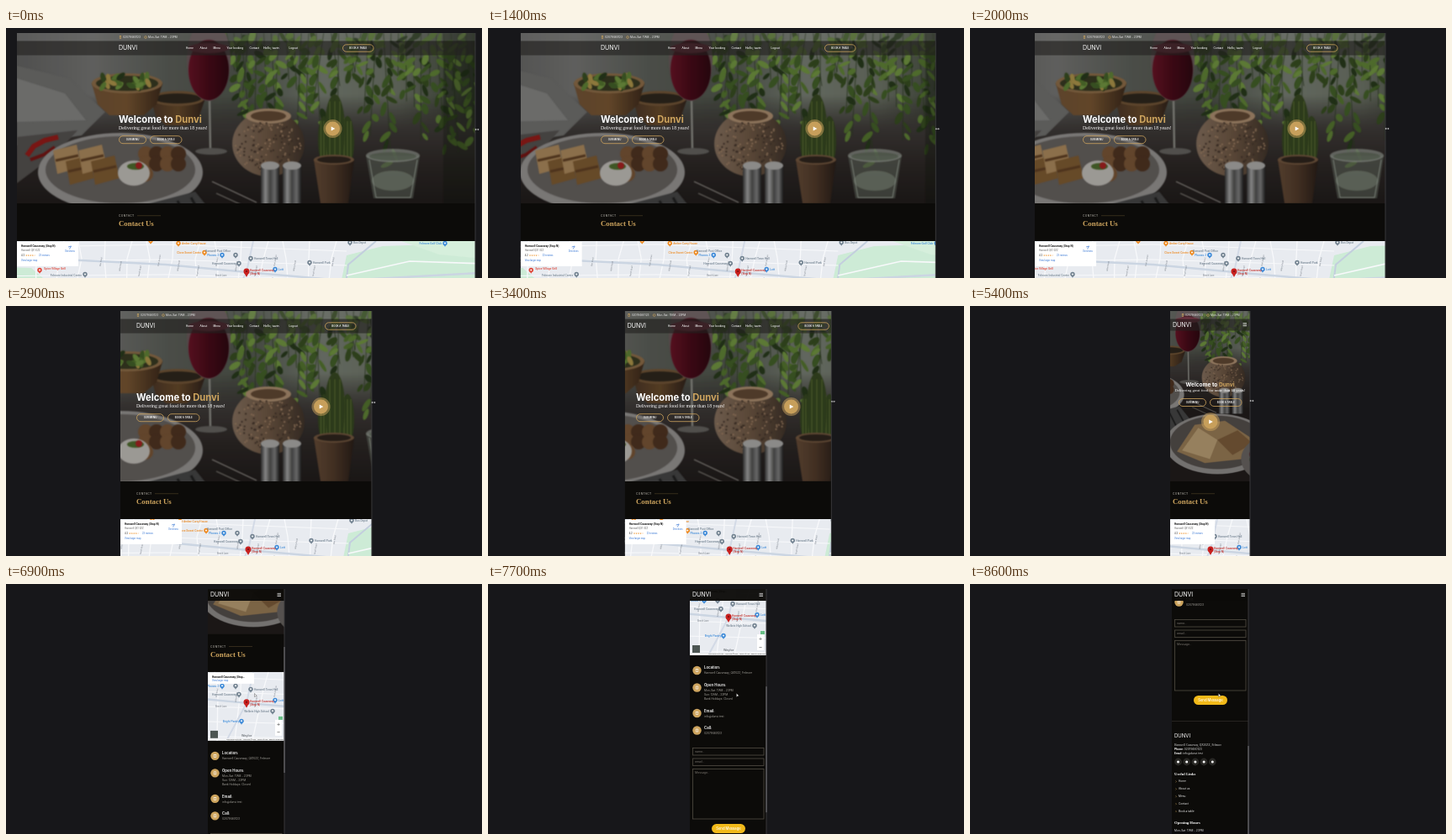
Recreate the animation shown at these times as an HTML page with a canvas. Size 566 by 298 pixels, loop 9000 ms.

```html
<!DOCTYPE html>
<html lang="en">
<head>
<meta charset="utf-8">
<title>Responsive restaurant page</title>
<style>
html, body { margin: 0; width: 100%; height: 100%; overflow: hidden; background: #17171a; }
canvas { display: block; width: 566px; height: 298px; }
</style>
</head>
<body>
<canvas id="stage"></canvas>
<script>
const W = 566, H = 298, TOP = 6, MID = 285.5, LOOP = 9000;
const SANS = 'Inter, sans-serif', SERIF = '"Liberation Serif", serif', MAPFONT = 'Roboto, sans-serif';
const GOLD = '#cda45e', INK = '#0c0b09';
const BRAND = 'Dunvi', PLACE = 'Harnwell Causeway', PHONE = '02079460123', EMAIL = 'info@dunvi.test';
const HOURS = 'Mon-Sat: 11AM - 23PM';

const canvas = document.getElementById('stage');
const dpr = window.devicePixelRatio || 1;
canvas.width = W * dpr;
canvas.height = H * dpr;
let g = canvas.getContext('2d');

// Linear interpolation through [time, value] points
function track(points, t) {
  if (t <= points[0][0]) return points[0][1];
  for (let i = 1; i < points.length; i++) {
    const [a, u] = points[i - 1], [b, v] = points[i];
    if (t <= b) return u + (v - u) * (t - a) / (b - a);
  }
  return points[points.length - 1][1];
}

const LEFT = [[1000, 13], [2000, 77], [2900, 136], [3000, 143], [4000, 192], [4200, 198], [5000, 225], [5400, 238], [6900, 240]];
const SCROLL = [[5900, 0], [6900, 149], [7400, 215], [7500, 215], [8500, 394], [8600, 404]];
const MAP_SHIFT = [[1000, 0], [2000, 28], [2900, 2], [4200, 0]];
const CURSOR_Y = [[0, 121], [2000, 120], [2900, 115], [4200, 112], [5400, 113]];

function rect(x, y, w, h, fill) {
  g.fillStyle = fill;
  g.fillRect(x, y, w, h);
}
function oval(x, y, rx, ry, fill, rot = 0) {
  g.fillStyle = fill;
  g.beginPath();
  g.ellipse(x, y, rx, ry, rot, 0, 7);
  g.fill();
}
const disc = (x, y, r, fill) => oval(x, y, r, r, fill);
function path(pts, color, width) {
  g.beginPath();
  pts.forEach(([x, y], i) => i ? g.lineTo(x, y) : g.moveTo(x, y));
  if (width) {
    g.strokeStyle = color;
    g.lineWidth = width;
    g.stroke();
  } else {
    g.fillStyle = color;
    g.fill();
  }
}
function text(s, x, y, size, color, { w = 400, f = SANS, align = 'left', gap = 0 } = {}) {
  g.font = `${w} ${size}px ${f}`;
  g.letterSpacing = gap + 'px';
  g.textAlign = align;
  g.textBaseline = 'middle';
  g.fillStyle = color;
  g.fillText(s, x, y);
  return g.measureText(s).width;
}
function pill(x, y, w, h, label, size = 2.9) {
  g.beginPath();
  g.roundRect(x, y, w, h, h / 2);
  g.strokeStyle = GOLD;
  g.lineWidth = 0.8;
  g.stroke();
  text(label, x + w / 2, y + h / 2 + 0.2, size, '#fff', { w: 600, align: 'center' });
}
// Gradient from evenly spaced colours
function blend(x0, y0, x1, y1, ...colors) {
  const grad = g.createLinearGradient(x0, y0, x1, y1);
  colors.forEach((c, i) => grad.addColorStop(i / (colors.length - 1), c));
  return grad;
}

function makePhoto() {
  const c = document.createElement('canvas');
  c.width = 546 * 2;
  c.height = 342 * 2;
  const main = g;
  g = c.getContext('2d');
  g.scale(2, 2);
  g.translate(-12.5, -TOP);
  g.filter = 'blur(1.4px)';
  let seed = 7;
  const rnd = () => (seed = seed * 16807 % 2147483647) / 2147483647;

  // Bright window, pale cloth, dark table
  rect(0, 0, W, 360, blend(13, 0, 558, 0, '#5c5c5b', '#6d6d6b', '#555852', '#4c5148', '#70766c', '#666c60', '#343a2e'));
  rect(0, 80, W, 280, blend(0, 80, 0, 205, 'rgba(42,38,36,0)', '#3a3634', '#2a2523', '#1f1b1a'));
  path([[13, 45], [75, 60], [118, 100], [90, 128], [13, 140]], '#696967');
  path([[13, 60], [70, 78], [95, 110], [13, 112]], '#7b7b79');
  path([[13, 130], [85, 122], [60, 150], [13, 185]], '#4f4c4a');

  // Foliage: hanging stems with paired leaves
  const greens = ['#34491f', '#4f6d2c', '#25361a', '#6a8b3d', '#3f5a26', '#5a7a33'];
  for (let i = 0; i < 34; i++) {
    const x0 = 262 + i * 8.9, len = 45 + rnd() * 115, lean = rnd() * 24 - 12;
    path([[x0, 6], [x0 + lean, 6 + len]], '#2c3a20', 0.8);
    for (let d = rnd() * 12; d < len; d += 11) {
      const side = rnd() < 0.5 ? -1 : 1, x = x0 + lean * d / len + side * 5;
      oval(x, 8 + d, 5 + rnd() * 4, 2 + rnd() * 2, greens[Math.floor(rnd() * 6)], side * (0.4 + rnd()));
    }
  }
  rect(520, 6, 40, 205, 'rgba(15,20,10,.3)');

  // Wooden bowls
  path([[172, 84], [237, 84], [229, 107], [215, 116], [190, 116], [178, 105]], blend(172, 0, 237, 0, '#473324', '#604528', '#2d2019'));
  oval(204, 84, 32, 9, '#6b5034');
  oval(204, 84, 28, 6, '#2b241b');
  path([[102, 66], [186, 66], [179, 91], [164, 104], [123, 104], [109, 91]], blend(102, 0, 186, 0, '#6b4e32', '#70502f', '#392719'));
  oval(144, 66, 42, 12, '#846644');
  oval(144, 66, 37, 9, '#343620');
  for (let i = 0; i < 24; i++) oval(110 + rnd() * 66, 56 + rnd() * 14, 6, 3, i % 4 ? greens[i % 6] : '#a18a45', rnd() * 3);

  // Chillies
  path([[25, 152], [33, 141], [46, 134], [62, 130]], '#8b1a17', 6);
  path([[29, 157], [45, 151], [58, 142]], '#6f1513', 4);

  // Wine
  path([[242, 86], [243, 145]], '#82827c', 2.5);
  oval(244, 147, 19, 4, '#5d5b58');
  oval(241, 38, 26, 49, '#625254');
  oval(241, 50, 24, 36, blend(216, 0, 266, 0, '#631324', '#430a17', '#2b0810'));
  oval(241, 24, 24, 6, '#74283a');

  // Candle holder
  oval(312, 138, 43, 39, blend(270, 0, 355, 0, '#7c6857', '#66513f', '#3d3128'));
  oval(312, 105, 27, 9, '#a18569');
  oval(312, 105, 21, 6, '#5a4330');
  for (let i = 0; i < 150; i++) {
    const a = rnd() * 6.3, r = Math.sqrt(rnd());
    disc(312 + Math.cos(a) * r * 40, 142 + Math.sin(a) * r * 31, 1.1, i % 2 ? '#94775d' : '#3f3128');
  }

  // Cactus
  for (const [x, y, rx, ry] of [[378, 133, 7, 28], [406, 135, 8, 30], [391, 121, 12, 42]]) {
    oval(x, y, rx, ry, '#33431f');
    for (let d = -rx / 2; d <= rx / 2; d += rx / 2) path([[x + d, y - ry * 0.8], [x + d, y + ry * 0.8]], '#596b32', 1);
  }
  path([[366, 157], [414, 157], [407, 209], [374, 209]], blend(366, 0, 414, 0, '#5f4734', '#4b3627', '#281d17'));
  oval(390, 157, 24, 6, '#6c523c');
  oval(390, 157, 20, 4, '#2b221b');

  // Water glass
  g.globalAlpha = 0.6;
  path([[428, 152], [492, 152], [484, 203], [437, 203]], '#5f675c');
  oval(460, 152, 32, 8, '#9da39b');
  oval(460, 153, 28, 5, '#4c5845');
  oval(460, 182, 25, 12, '#7d8879');
  g.globalAlpha = 1;
  path([[432, 157], [440, 202], [481, 202], [489, 157]], '#8c948a', 1);

  // Plate with pastries
  oval(136, 172, 98, 47, '#8b8987');
  oval(136, 169, 89, 40, '#5f5b58');
  for (let i = 0; i < 4; i++) {
    const x = 56 + i * 15, y = 146 + i % 2 * 13;
    path([[x, y], [x + 28, y - 7], [x + 34, y + 20], [x + 5, y + 28]], i % 2 ? '#76552f' : '#a08057');
    path([[x + 3, y + 12], [x + 30, y + 6]], '#5a3c22', 3);
  }
  for (let i = 0; i < 9; i++) disc(166 + i % 4 * 13, 150 + Math.floor(i / 4) * 12, 9, i % 2 ? '#4a3120' : '#715033');
  oval(152, 173, 19, 15, '#b3b0ab');
  oval(154, 165, 10, 4, '#49642b');
  disc(158, 164, 4, '#9c2020');

  // Napkin and cutlery
  path([[130, 220], [225, 195], [265, 245], [150, 290]], '#414141');
  for (let i = 0; i < 6; i++) path([[140 + i * 16, 222 - i * 4], [160 + i * 17, 282 - i * 7]], '#202020', 3);
  path([[245, 183], [298, 208]], '#77736f', 1.5);
  path([[250, 197], [300, 220]], '#686560', 1.5);

  // Lower plates
  oval(300, 270, 104, 60, '#858280');
  oval(300, 267, 94, 53, '#4f4a47');
  path([[220, 285], [255, 232], [315, 224], [377, 265], [350, 300], [275, 308]], '#8e7350');
  path([[230, 283], [262, 238], [300, 262], [285, 300]], '#ad946d');
  path([[300, 262], [340, 243], [370, 269], [330, 292]], '#735637');
  oval(405, 300, 58, 46, '#625e5b');
  for (let i = 0; i < 22; i++) disc(370 + rnd() * 70, 275 + rnd() * 45, 8, i % 2 ? '#551d20' : '#37472a');

  // Shakers
  for (const x of [314, 340]) {
    rect(x - 11, 164, 22, 46, blend(x - 11, 0, x + 11, 0, '#333', '#999', '#4b4b4a', '#777', '#222'));
    oval(x, 164, 11, 5, '#a09f9d');
  }
  rect(0, 0, W, 360, 'rgba(0,0,0,.13)');
  g = main;
  return c;
}
const photo = makePhoto();

function pin(x, y, color, label = '', dx = 4, dy = 0) {
  path([[x - 2.4, y], [x + 2.4, y], [x, y + 3.8]], color);
  disc(x, y - 0.5, 2.7, color);
  disc(x, y - 0.5, 1, '#fff');
  if (label) text(label, x + dx, y + dy, 3.3, color, { w: 500, f: MAPFONT, align: dx < 0 ? 'right' : 'left' });
}

function drawMap(left, right, shift, y0, small) {
  g.save();
  g.beginPath();
  g.rect(left, y0, right - left, 82);
  g.clip();
  g.save();
  g.translate(shift, y0 - 254);
  rect(-60, 254, 700, 82, '#e8ebf0');
  path([[405, 271], [448, 260], [510, 258], [570, 268], [570, 336], [410, 336], [399, 300]], '#cdebd6');
  path([[470, 254], [570, 254], [570, 275], [515, 270]], '#d6efdc');
  path([[-60, 284], [30, 286], [44, 298], [-60, 310]], '#cdebd6');
  const road = '#f8f9fb';
  for (let i = 0; i < 15; i++) {
    const x = 5 + i * 27;
    path([[x + i % 3 * 5, 254], [x + 4, 275], [x + 9 - i % 4 * 6, 336]], road, 1.3);
  }
  for (let i = 0; i < 5; i++) path([[-40, 262 + i * 17], [190, 258 + i * 18], [405, 266 + i * 17]], road, 1);
  path([[-40, 272], [90, 277], [190, 282], [286, 291], [400, 301], [600, 290]], '#cbd5e2', 2.4);
  path([[262, 336], [276, 310], [286, 291], [294, 254]], '#d3dae6', 2);
  path([[400, 336], [407, 282], [440, 254]], '#c3cede', 2);
  path([[405, 295], [480, 278], [570, 281]], road, 1.6);

  const streets = ['Elm Road', 'Alder Road', 'North Road', 'Park Avenue', 'Abbey Road', 'South Road'];
  for (let i = 0; i < 13; i++) {
    g.save();
    g.translate(112 + i * 23, 284 + i % 3 * 6);
    g.rotate(-1.4);
    text(streets[i % 6], 0, 0, 2.5, '#777e87', { f: MAPFONT });
    g.restore();
  }
  text('Beech Lane', 249, 295, 2.6, '#777e87', { f: MAPFONT });

  const grey = '#738391', blue = '#3f8bd8', orange = '#ee8a20';
  pin(205, 257, orange, 'Amber Curry House');
  pin(236, 268, orange, 'Clove Sweet Centre', -4);
  pin(172, 254, orange, '');
  pin(257, 271, blue, 'Phones 2', -4);
  pin(273, 271, grey, 'Harnwell Post Office', -6, -4.5);
  pin(291, 275, grey, 'Harnwell Town Hall');
  pin(277, 281, grey, PLACE, -3);
  pin(361, 280, grey, 'Harnwell Park');
  pin(409, 256, grey, 'Bus Depot');
  pin(522, 257, blue, 'Felmore Golf Club', -4);
  pin(40, 289, '#de4739', 'Spice Village Grill', 5, -2);
  pin(94, 294, grey, 'Felmore Industrial Centre', -4, 1);
  pin(320, 288, blue, 'Lott', 4);
  pin(317, 301, grey, 'Welbrin High School', -4);
  pin(280, 313, blue, 'Bright Pantry', -3);
  disc(286, 290, 3.5, '#c8201e');
  path([[282.8, 291], [289.2, 291], [286, 297]], '#c8201e');
  disc(286, 290, 1.1, '#7c0d12');
  text(PLACE, 290, 289, 3.3, '#c3322d', { w: 500, f: MAPFONT });
  text('(Stop N)', 290, 292.8, 3.3, '#c3322d', { w: 500, f: MAPFONT });
  text('Waylor', 286, 330, 4, '#6d7278', { w: 500, f: MAPFONT, align: 'center' });
  g.restore();

  // Info card
  const link = '#3575d3', wide = right - left > 110;
  rect(left, y0 + 1, wide ? 73 : small ? 55 : 53, small ? 13 : 29, '#fff');
  text(small ? 'Harnwell Causeway (Stop…' : PLACE + ' (Stop N)', left + 5, y0 + 6.5, 3.2, '#111', { w: 700, f: MAPFONT });
  if (small) {
    text('View larger map', left + 5, y0 + 10.8, 2.7, link, { f: MAPFONT });
  } else {
    text('Harnwell QX1 0ZZ', left + 5, y0 + 11.5, 2.8, '#666', { f: MAPFONT });
    text('4.2', left + 5, y0 + 17.5, 2.9, '#333', { f: MAPFONT });
    text('★★★★☆', left + 10, y0 + 17.5, 2.8, '#ec8c1d', { f: '"DejaVu Sans", sans-serif' });
    text('23 reviews', left + 26, y0 + 17.5, 2.7, link, { f: MAPFONT });
    text('View larger map', left + 5, y0 + 23.5, 2.7, link, { f: MAPFONT });
    if (wide) {
      path([[left + 61, y0 + 7], [left + 64.5, y0 + 6], [left + 62.5, y0 + 9.5]], link, 0.7);
      text('Directions', left + 63, y0 + 12.5, 2.6, link, { f: MAPFONT, align: 'center' });
    }
  }

  // Controls and credits
  rect(left + 3, y0 + 70, 9, 9, '#4d5653');
  rect(right - 11, y0 + 57, 8, 19, '#fff');
  rect(right - 7, y0 + 53, 5, 4, '#69bf87');
  text('+', right - 7, y0 + 62, 7, '#555', { align: 'center' });
  text('−', right - 7, y0 + 71.5, 7, '#555', { align: 'center' });
  rect(left, y0 + 79, right - left, 3, 'rgba(245,245,245,.85)');
  text('Keyboard shortcuts   Map data ©2023   Terms of Use   Report a map error', right - 1, y0 + 80.6, 2.1, '#333', { f: MAPFONT, align: 'right' });
  g.restore();
}

function drawHero(left, right, box, mobile, scroll) {
  const k = mobile ? 0.6 : 1, y = TOP - scroll;
  g.save();
  g.beginPath();
  g.rect(left, y, right - left, 203);
  g.clip();
  g.drawImage(photo, MID - 273 * k, y, 546 * k, 342 * k);
  g.restore();
  const size = mobile ? 6.55 : 11.2, ty = (mobile ? 93.8 : 109.4) - scroll;
  const bold = { w: 700 }, hello = 'Welcome to ';
  g.font = `700 ${size}px ${SANS}`;
  g.letterSpacing = '0px';
  const x = mobile ? MID - g.measureText(hello + BRAND).width / 2 : box;
  const w = text(hello, x, ty, size, '#fff', bold);
  text(BRAND, x + w, ty, size, GOLD, bold);
  text('Delivering great food for more than 18 years!', mobile ? MID : box, (mobile ? 100.5 : 119) - scroll,
    mobile ? 4.6 : 5.8, '#fff', { f: SERIF, align: mobile ? 'center' : 'left' });
  const bx = mobile ? 248.5 : box + 0.5, by = (mobile ? 110.5 : 128.7) - scroll;
  pill(bx, by, 32, 9, 'OUR MENU');
  pill(bx + 37, by, 37.5, 9, 'BOOK A TABLE');
  const px = mobile ? 286 : box + (MID - box) * 5 / 3 + 2, py = (mobile ? 138 : 120) - scroll;
  disc(px, py, 11, 'rgba(205,164,94,.5)');
  disc(px, py, 8.5, '#c79f5b');
  path([[px - 1.8, py - 2.6], [px + 2.8, py], [px - 1.8, py + 2.6]], '#fff');
}

function drawHeader(left, right, mobile, scroll) {
  const width = right - left, moved = scroll > 8, y = moved ? TOP : 15.5;
  const side = width > 328 ? 151.5 : width > 281 ? 130.5 : width / 2 - 3;
  const x = MID - side;
  if (!moved) {
    rect(left, TOP, width, 9.5, 'rgba(150,150,148,.16)');
    const tx = mobile ? 251 : x;
    g.strokeStyle = GOLD;
    g.lineWidth = 0.6;
    g.strokeRect(tx + 1.2, 9.5, 1.6, 3);
    text(PHONE, tx + 5, 11.3, 3.2, '#eee');
    g.beginPath();
    g.arc(tx + 32, 11, 1.4, 0, 7);
    g.stroke();
    text(HOURS, tx + 35, 11.3, 3.2, '#eee');
  }
  const h = mobile ? 14 : 17;
  rect(left, y, width, h, moved ? 'rgba(12,11,9,.96)' : 'rgba(34,33,31,.62)');
  const cy = moved ? 13.3 : mobile ? 22.5 : 24;
  text(BRAND.toUpperCase(), x, cy, 7, '#fff', { w: 400 });
  if (mobile) {
    for (const d of [-1.7, 0, 1.7]) rect(right - 8.5, cy - 0.7 + d, 4.5, 0.7, '#eee');
    return;
  }
  const nav = [['Home', 214], ['About', 230.5], ['Menu', 246.5], ['Your booking', 262.5], ['Contact', 289.5], ['Logout', 336.5]];
  for (const [s, nx] of nav) text(s, nx, cy, 3.1, '#fff', { w: 500 });
  text('Hello, tavin', 306, cy, 3.5, '#fff', { w: 500 });
  pill(MID + side - 36.5, 19.8, 36.5, 8.4, 'BOOK A TABLE');
}

function drawDetails(left, right, scroll) {
  const x = left + 3, w = right - left - 6;
  g.save();
  g.translate(0, -scroll);
  const info = [
    [354, 351, 'Location:', [PLACE + ', QX10ZZ, Felmore']],
    [374.5, 372, 'Open Hours:', ['Mon-Sat: 11AM - 23PM', 'Sun: 12AM - 22PM', 'Bank Holidays: Closed']],
    [405, 402.5, 'Email:', [EMAIL]],
    [425.5, 422.5, 'Call:', [PHONE]]
  ];
  for (const [iy, hy, title, lines] of info) {
    disc(x + 5.5, iy, 5.2, GOLD);
    g.strokeStyle = '#fff';
    g.lineWidth = 0.6;
    g.strokeRect(x + 4.2, iy - 1.5, 2.6, 3);
    text(title, x + 14, hy, 4.3, '#fff', { w: 600 });
    lines.forEach((s, i) => text(s, x + 14, hy + 6.5 + i * 5, 3.2, '#a5a29c'));
  }
  for (const [y, h, label] of [[446.5, 8.5, 'name..'], [459, 8.5, 'email..'], [471.5, 59.5, 'Message..']]) {
    g.strokeStyle = '#514c43';
    g.lineWidth = 0.8;
    g.strokeRect(x + 0.5, y, w - 0.5, h);
    text(label, x + 3, y + 4.4, 3.5, '#77736c');
  }
  g.fillStyle = '#f1b919';
  g.beginPath();
  g.roundRect(MID - 19.5, 537, 40, 11, 5.5);
  g.fill();
  text('Send Message', MID + 0.5, 542.6, 4.2, '#fff', { w: 500, align: 'center' });

  rect(left, 567, right - left, 0.8, '#2d2a26');
  text(BRAND.toUpperCase(), x, 585.5, 6, '#fff', { w: 400 });
  text(PLACE + ', QX10ZZ, Felmore', x, 596, 3.5, '#ddd', { f: SERIF });
  const ph = text('Phone: ', x, 601.3, 3.2, '#fff', { w: 700 });
  text(PHONE, x + ph, 601.3, 3.2, '#ddd');
  const em = text('Email: ', x, 606.3, 3.2, '#fff', { w: 700 });
  text(EMAIL, x + em, 606.3, 3.2, '#ddd');
  for (let i = 0; i < 5; i++) {
    disc(x + 4.5 + i * 10.2, 616, 4.4, '#292825');
    disc(x + 4.5 + i * 10.2, 616, 1.5, '#fff');
  }
  const head = { w: 700, f: SERIF };
  text('Useful Links', x, 630.5, 4.7, '#fff', head);
  ['Home', 'About us', 'Menu', 'Contact', 'Book a table'].forEach((s, i) => {
    const y = 639.5 + i * 8.9;
    path([[x + 1.5, y - 1], [x + 2.5, y], [x + 1.5, y + 1]], GOLD, 0.5);
    text(s, x + 5, y, 3.2, '#eee');
  });
  text('Opening Hours', x, 689, 4.7, '#fff', head);
  text(HOURS, x, 698, 3.2, '#ddd');
  g.restore();
}

function drawCursor(right, t) {
  if (t < 5900) {
    const x = right + 2, y = track(CURSOR_Y, t);
    path([[x - 1.8, y], [x + 1.8, y]], '#bbb', 0.7);
    path([[x - 2.6, y], [x - 1, y - 1.2], [x - 1, y + 1.2]], '#bbb');
    path([[x + 2.6, y], [x + 1, y - 1.2], [x + 1, y + 1.2]], '#bbb');
  } else {
    const x = track([[5900, 333], [6400, 295.5]], t), y = track([[5900, 113], [6400, 130.5]], t);
    const tip = [[x, y], [x + 2.8, y + 2.8], [x + 1.5, y + 3], [x, y + 4], [x, y]];
    path(tip, '#fff');
    path(tip, '#333', 0.4);
  }
}

function draw(t) {
  const left = track(LEFT, t), right = 2 * MID - left, width = right - left;
  const scroll = track(SCROLL, t), mobile = width < 232;
  // Container half widths at each breakpoint
  const half = width > 328 ? 151.5 : width > 281 ? 130.5 : width > 232 ? 109.5 : width > 180 ? 81.5 : width > 135 ? 60.5 : width / 2 - 3;
  const box = MID - half;
  g.setTransform(dpr, 0, 0, dpr, 0, 0);
  rect(0, 0, W, H, '#17171a');
  g.save();
  g.beginPath();
  g.rect(left, TOP, width, H - TOP);
  g.clip();
  rect(left, TOP, width, H, INK);
  drawHero(left, right, box, mobile, scroll);
  text('CONTACT', box, 224 - scroll, 3.3, '#aaa79f', { w: 500, gap: 0.35 });
  rect(box + 22, 223.6 - scroll, 28, 0.5, '#5c4b2f');
  text('Contact Us', box, 233.7 - scroll, 8.8, GOLD, { w: 700, f: SERIF });
  drawMap(left, right, track(MAP_SHIFT, t), 254 - scroll, t > 6000);
  if (mobile) drawDetails(left, right, scroll);
  drawHeader(left, right, mobile, scroll);
  g.restore();
  rect(right - 0.5, TOP, 1, H, '#38383a');
  if (scroll) rect(right - 0.5, TOP + scroll * 0.463, 1, 150, '#77777a');
  drawCursor(right, t);
}

function tick() {
  draw(performance.now() % LOOP);
  requestAnimationFrame(tick);
}
tick();
</script>
</body>
</html>
```
